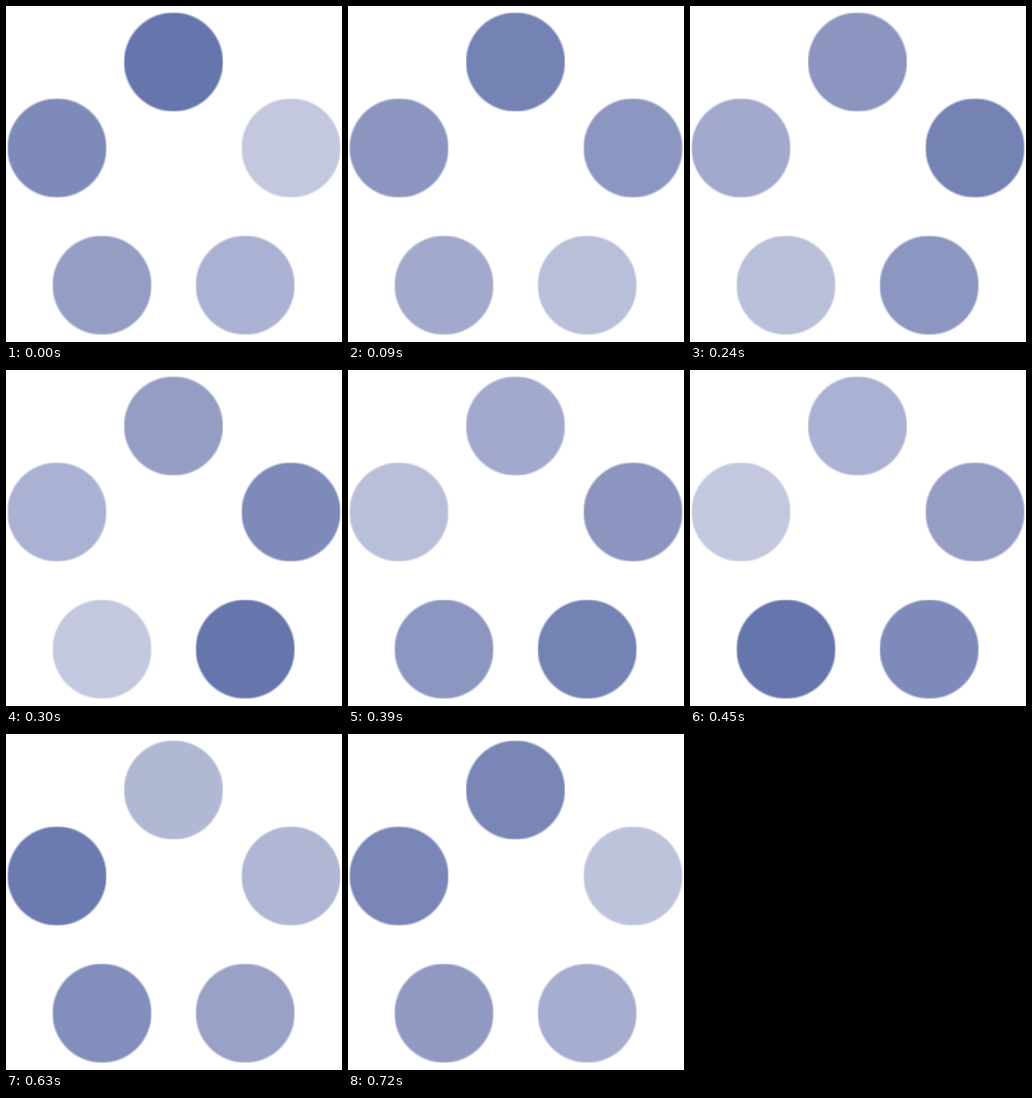
Recreate the animation shown at these times as an HTML page with a canvas. Size 336 by 336 pixels, loop 750 ms.

```html
<!DOCTYPE html>
<html lang="en">
<head>
<meta charset="utf-8">
<title>Loading</title>
<style>
  html, body { margin: 0; width: 100%; height: 100%; overflow: hidden; background: #fff; }
  canvas { display: block; width: 336px; height: 336px; }
</style>
</head>
<body>
<canvas id="stage" width="336" height="336"></canvas>
<script>
const ctx = document.getElementById("stage").getContext("2d");
const LOOP = 750, TICK = 30, STEP = 150;
const HALF = 49.6, RADIUS = 50.2, SOFT = 1;

// Clockwise from the top, in the order the dark dot travels.
const dots = [[167.5, 56], [285, 142], [239.2, 279.2], [96, 279.2], [51, 142]];

// Shades a dot passes through as it fades, one per step.
const shades = [
  [102, 118, 172], [126, 138, 186], [148, 157, 196], [171, 177, 210], [195, 200, 222]
];

function shadeAt(phase) {
  const i = Math.floor(phase), t = phase - i;
  const next = shades[(i + 1) % shades.length];
  return shades[i].map((v, k) => Math.round(v + (next[k] - v) * t)).join(",");
}

// A dot with a soft rim and slightly flattened sides.
function drawDot(x, y, rgb) {
  const rim = ctx.createRadialGradient(x, y, RADIUS - 2 * SOFT, x, y, RADIUS + SOFT / 2);
  rim.addColorStop(0, `rgba(${rgb},1)`);
  rim.addColorStop(1, `rgba(${rgb},0)`);
  ctx.fillStyle = rim;
  ctx.fillRect(x - HALF, y - HALF, 2 * HALF, 2 * HALF);
}

function draw(now) {
  const time = Math.floor((now % LOOP) / TICK) * TICK;
  const lead = time / STEP, n = dots.length;
  ctx.fillStyle = "#fff";
  ctx.fillRect(0, 0, 336, 336);
  dots.forEach(([x, y], i) => drawDot(x, y, shadeAt((lead - i + n) % n)));
}

let start;
function frame(now) {
  start ??= now;
  draw(now - start);
  requestAnimationFrame(frame);
}
draw(0);
requestAnimationFrame(frame);
</script>
</body>
</html>
```
